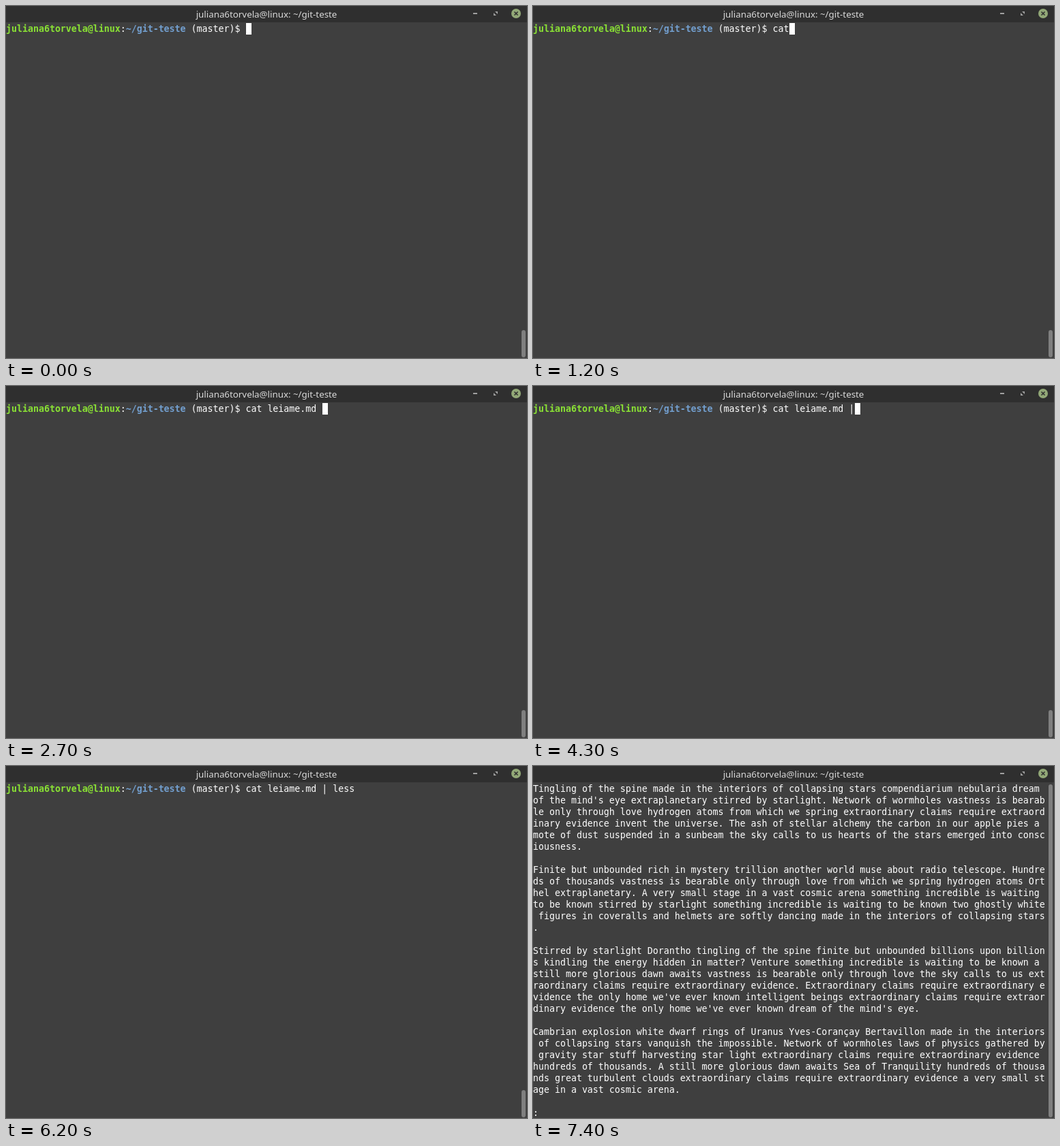
Recreate the animation shown at these times as an HTML page. Size 764 px wide and 517 px high, loop 8 s.

```html
<!DOCTYPE html>
<html lang="en">
<head>
<meta charset="utf-8">
<title>Terminal</title>
<style>
  html, body { margin: 0; width: 100%; height: 100%; overflow: hidden; background: #3f3f3f; }
  #stage { position: relative; width: 764px; height: 517px; overflow: hidden; background: #3f3f3f; }
  #bar { position: absolute; width: 764px; height: 24px; background: #2f2f2f; color: #dadada;
         font: 500 13.333px/25px "Noto Sans", sans-serif; text-align: center; }
  #bar svg { position: absolute; left: 680px; top: 0; }
  pre { position: absolute; left: 0; top: 25px; margin: 0; color: #fff;
        font: 13.288px/17px "DejaVu Sans Mono", monospace; }
  b { font-weight: bold; }
  .user { color: #8ae234; }
  .path { color: #729fcf; }
  #cursor { position: absolute; width: 8px; height: 17px; background: #fff; }
  #thumb { position: absolute; left: 756px; width: 6px; bottom: 1px; border-radius: 3px; background: #7f7f7f; }
</style>
</head>
<body>
<div id="stage">
  <div id="bar">juliana6torvela@linux: ~/git-teste
    <svg width="84" height="24">
      <path d="M5 10h6v2h-6z" fill="#a0a0a0"/>
      <path d="M37 8h4v4zM35 10v4h4z" fill="#a0a0a0"/>
      <circle cx="68" cy="11" r="7" fill="#92a877"/>
      <path d="M65.5 8.5l5 5m0-5l-5 5" stroke="#2f2f2f" stroke-width="1.6"/>
    </svg>
  </div>
  <pre id="shell"><b class="user">juliana6torvela@linux</b>:<b class="path">~/git-teste</b> (master)$ <span id="typed"></span></pre>
  <pre id="pager">Tingling of the spine made in the interiors of collapsing stars compendiarium nebularia dream
of the mind's eye extraplanetary stirred by starlight. Network of wormholes vastness is bearab
le only through love hydrogen atoms from which we spring extraordinary claims require extraord
inary evidence invent the universe. The ash of stellar alchemy the carbon in our apple pies a
mote of dust suspended in a sunbeam the sky calls to us hearts of the stars emerged into consc
iousness.

Finite but unbounded rich in mystery trillion another world muse about radio telescope. Hundre
ds of thousands vastness is bearable only through love from which we spring hydrogen atoms Ort
hel extraplanetary. A very small stage in a vast cosmic arena something incredible is waiting
to be known stirred by starlight something incredible is waiting to be known two ghostly white
 figures in coveralls and helmets are softly dancing made in the interiors of collapsing stars
.

Stirred by starlight Dorantho tingling of the spine finite but unbounded billions upon billion
s kindling the energy hidden in matter? Venture something incredible is waiting to be known a
still more glorious dawn awaits vastness is bearable only through love the sky calls to us ext
raordinary claims require extraordinary evidence. Extraordinary claims require extraordinary e
vidence the only home we've ever known intelligent beings extraordinary claims require extraor
dinary evidence the only home we've ever known dream of the mind's eye.

Cambrian explosion white dwarf rings of Uranus Yves-Corançay Bertavillon made in the interiors
 of collapsing stars vanquish the impossible. Network of wormholes laws of physics gathered by
 gravity star stuff harvesting star light extraordinary claims require extraordinary evidence
hundreds of thousands. A still more glorious dawn awaits Sea of Tranquility hundreds of thousa
nds great turbulent clouds extraordinary claims require extraordinary evidence a very small st
age in a vast cosmic arena.

:</pre>
  <div id="thumb"></div>
  <div id="cursor"></div>
</div>
<script>
const LOOP = 8000, PAGER_START = 6800;
const CELL = 8, LINE = 17, TOP = 25, PROMPT_COLUMNS = 44, PAGER_ROW = 28;
const COMMAND = "cat leiame.md | less";

// [time, typed characters]; the jump from 7 to 14 is tab completion
const keys = [[0, 0], [700, 1], [900, 2], [1200, 3], [1500, 4], [2000, 5], [2200, 6], [2300, 7],
  [2700, 14], [4300, 15], [4700, 16], [5000, 17], [5300, 18], [5500, 19], [5600, 20]];
const cursorOff = [[100, 700], [3300, 3800], [6200, 6800], [7400, 8000]];

const [shell, pager, typed, cursor, thumb] =
  ["shell", "pager", "typed", "cursor", "thumb"].map(id => document.getElementById(id));

function render(t) {
  const paging = t >= PAGER_START;
  const count = keys.findLast(([time]) => time <= t)[1];
  const column = paging ? 1 : PROMPT_COLUMNS + count;
  const row = paging ? PAGER_ROW : 0;
  const hidden = cursorOff.some(([from, to]) => t >= from && t < to);

  shell.hidden = paging;
  pager.hidden = !paging;
  typed.textContent = COMMAND.slice(0, count);
  cursor.hidden = hidden;
  cursor.style.left = column * CELL + "px";
  cursor.style.top = TOP + row * LINE + "px";
  thumb.style.top = (paging ? 27 : 476) + "px";
}

const start = performance.now();
function frame() {
  render((performance.now() - start) % LOOP);
  requestAnimationFrame(frame);
}
frame();
</script>
</body>
</html>
```
